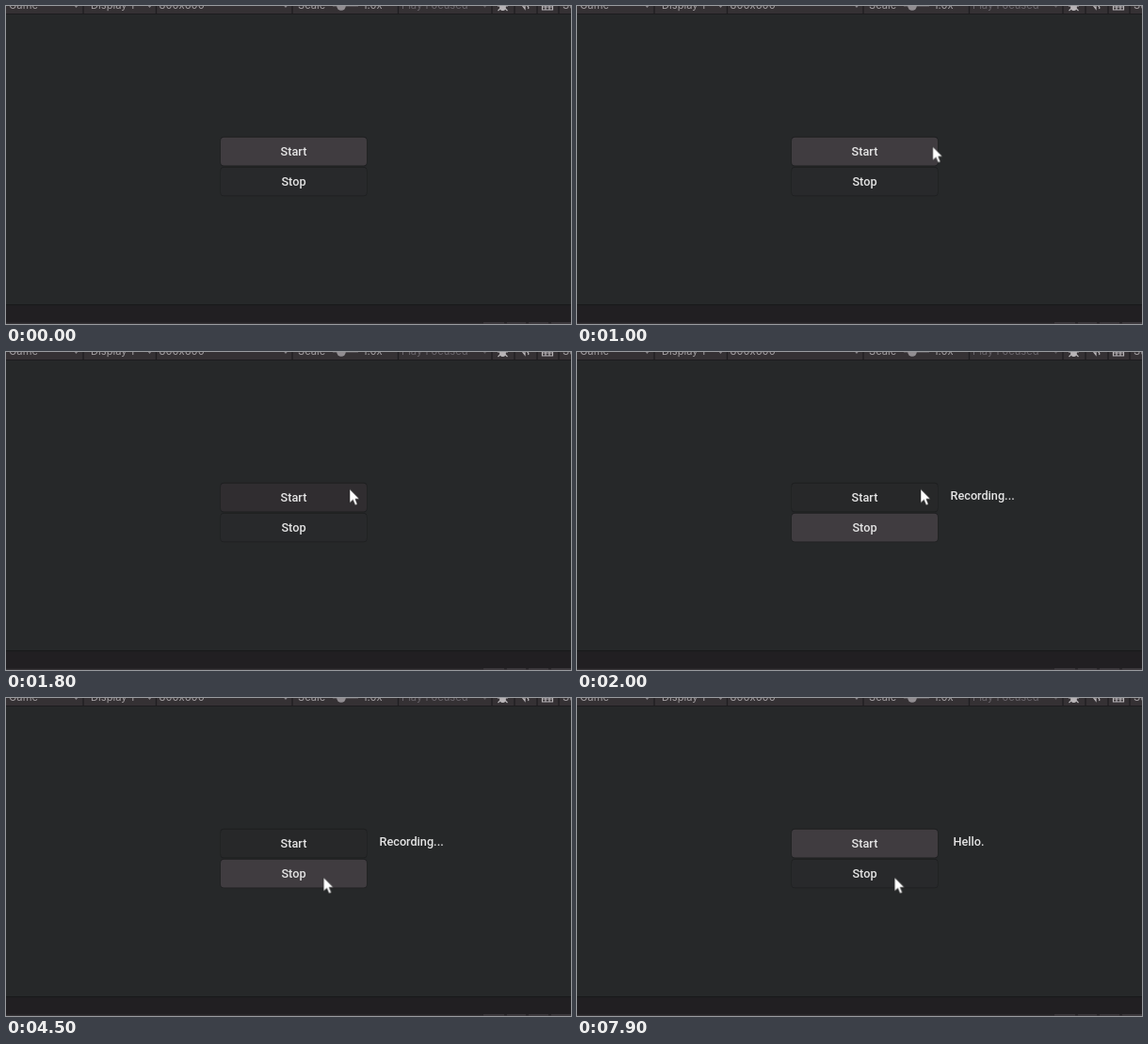
These frames come from a looping animation (600 by 338 pixels, 8000 ms). An HTML page:

```html
<!DOCTYPE html>
<html lang="en">
<head>
<meta charset="utf-8">
<title>Recorder buttons</title>
<style>
  html, body { margin: 0; width: 100%; height: 100%; overflow: hidden; background: #262829; }
  svg { display: block; width: 100vw; height: 100vh; }
  .bar { font: 400 11.2px Inter, sans-serif; fill: #a29ea1; }
  .dim { fill: #68646a; }
  .ui { font: 500 12.7px Roboto, sans-serif; fill: #e4e4e4; }
  .mid { text-anchor: middle; }

  /* every change is a hard step; 1% = 80 ms */
  .loop { animation: 8s step-end infinite; }
  #start { animation-name: start; }
  #stop { animation-name: stop; }
  #rec { animation-name: rec; }
  #send { animation-name: send; fill: #d8cb1e; }
  #reply { animation-name: reply; }
  #cursor { animation-name: move; }

  @keyframes start {
    0%, 98.75%, 100% { fill: #403c40; }
    22.5% { fill: #302d30; }
    25% { fill: #272829; }
  }
  @keyframes stop {
    0%, 63.75%, 100% { fill: #28292b; }
    25% { fill: #403c40; }
    61.25% { fill: #302d30; }
  }
  @keyframes rec { 0%, 63.75%, 100% { opacity: 0; } 25% { opacity: 1; } }
  @keyframes send { 0%, 98.75%, 100% { opacity: 0; } 63.75% { opacity: .85; } 65% { opacity: 1; } }
  @keyframes reply { 0% { opacity: 0; } 98.75%, 100% { opacity: 1; } }
  @keyframes move {
    0% { opacity: 0; transform: translate(441px, 139px); }
    6.25% { opacity: 1; transform: translate(441px, 139.5px); }
    7.5% { opacity: 1; transform: translate(428px, 142px); }
    8.75% { opacity: 1; transform: translate(413px, 145px); }
    10% { opacity: 1; transform: translate(399px, 147px); }
    11.25% { opacity: 1; transform: translate(386px, 149px); }
    12.5% { opacity: 1; transform: translate(377.7px, 149.5px); }
    13.75% { opacity: 1; transform: translate(372px, 152px); }
    15% { opacity: 1; transform: translate(367px, 149.5px); }
    16.25% { opacity: 1; transform: translate(365px, 145.7px); }
    52.5% { opacity: 1; transform: translate(357.3px, 154.8px); }
    53.75% { opacity: 1; transform: translate(348px, 171px); }
    55% { opacity: 1; transform: translate(340px, 185px); }
    56.25%, 100% { opacity: 1; transform: translate(337.3px, 190.7px); }
  }
</style>
</head>
<body>
<svg viewBox="0 0 600 338" preserveAspectRatio="none">
  <rect width="600" height="338" fill="#262829"/>

  <!-- toolbar -->
  <rect width="600" height="8" fill="#353134"/>
  <rect y="8" width="600" height="1" fill="#1d1c1e"/>
  <path d="M82 0V8M159.500 0V8M304 0V8M416.500 0V8M516 0V8M540 0V8M564 0V8M587 0V8" stroke="#1f1d20" stroke-width="1.3"/>
  <g class="bar">
    <text x="3" y="3">Game</text>
    <text x="90" y="3">Display 1</text>
    <text x="162.500" y="3">800x600</text>
    <text x="310" y="3">Scale</text>
    <text x="379" y="3">1.0x</text>
    <text x="420" y="3" class="dim">Play Focused</text>
    <text x="591" y="3">Stats</text>
  </g>
  <path d="M72 -1h5l-2.500 3zM150 -1h5l-2.500 3zM294.500 -1h5l-2.500 3z" fill="#858185"/>
  <path d="M506 -1h5l-2.500 3z" fill="#5b575b"/>
  <path d="M347 0H374" stroke="#5b575b" stroke-width="1.500"/>
  <circle cx="356" cy="0" r="4.800" fill="#918d91"/>
  <g fill="none" stroke="#b8b4b7" stroke-width="1.200">
    <path d="M522 0h11M522.500 5l2.500-2.500M532.500 5l-2.500-2.500"/>
    <ellipse cx="527.500" cy="0.500" rx="2.800" ry="4" fill="#b8b4b7"/>
    <path d="M545 -1h3l3 4v-4M553.500 0q2 1 1 3"/>
    <path d="M569.500 -2V4H580.500V-2M570 1H580M573 0V4M577 0V4"/>
  </g>

  <!-- lower panel -->
  <rect y="317" width="600" height="1.500" fill="#19191a"/>
  <rect y="318.500" width="600" height="19.500" fill="#211f22"/>
  <rect y="336.700" width="600" height="1.300" fill="#373337"/>
  <path d="M507 337H529M532 337H552M555 337H576M579 337H600" stroke="#423e42" stroke-width="1.400"/>

  <!-- buttons -->
  <g fill="#1d1e1f">
    <rect x="227.500" y="138.700" width="156" height="31.800" rx="4"/>
    <rect x="227.500" y="171" width="156" height="31.300" rx="4"/>
  </g>
  <rect id="start" class="loop" x="228" y="139.700" width="155" height="29.800" rx="3.500" fill="#403c40"/>
  <rect id="stop" class="loop" x="228" y="171.700" width="155" height="29.800" rx="3.500" fill="#28292b"/>
  <g class="ui">
    <text class="mid" x="305.500" y="159">Start</text>
    <text class="mid" x="305.500" y="191">Stop</text>
    <text id="rec" class="loop" x="396.500" y="157">Recording...</text>
    <text id="send" class="loop" x="396.500" y="157">Sending...</text>
    <text id="reply" class="loop" x="399.500" y="157">Hello.</text>
  </g>

  <g id="cursor" class="loop">
    <path d="M0 0V14.500L3.400 11.400L5.800 17L8.200 16L5.900 10.500H10.300Z" fill="#fff" stroke="#222" stroke-width=".5"/>
  </g>
</svg>
</body>
</html>
```
